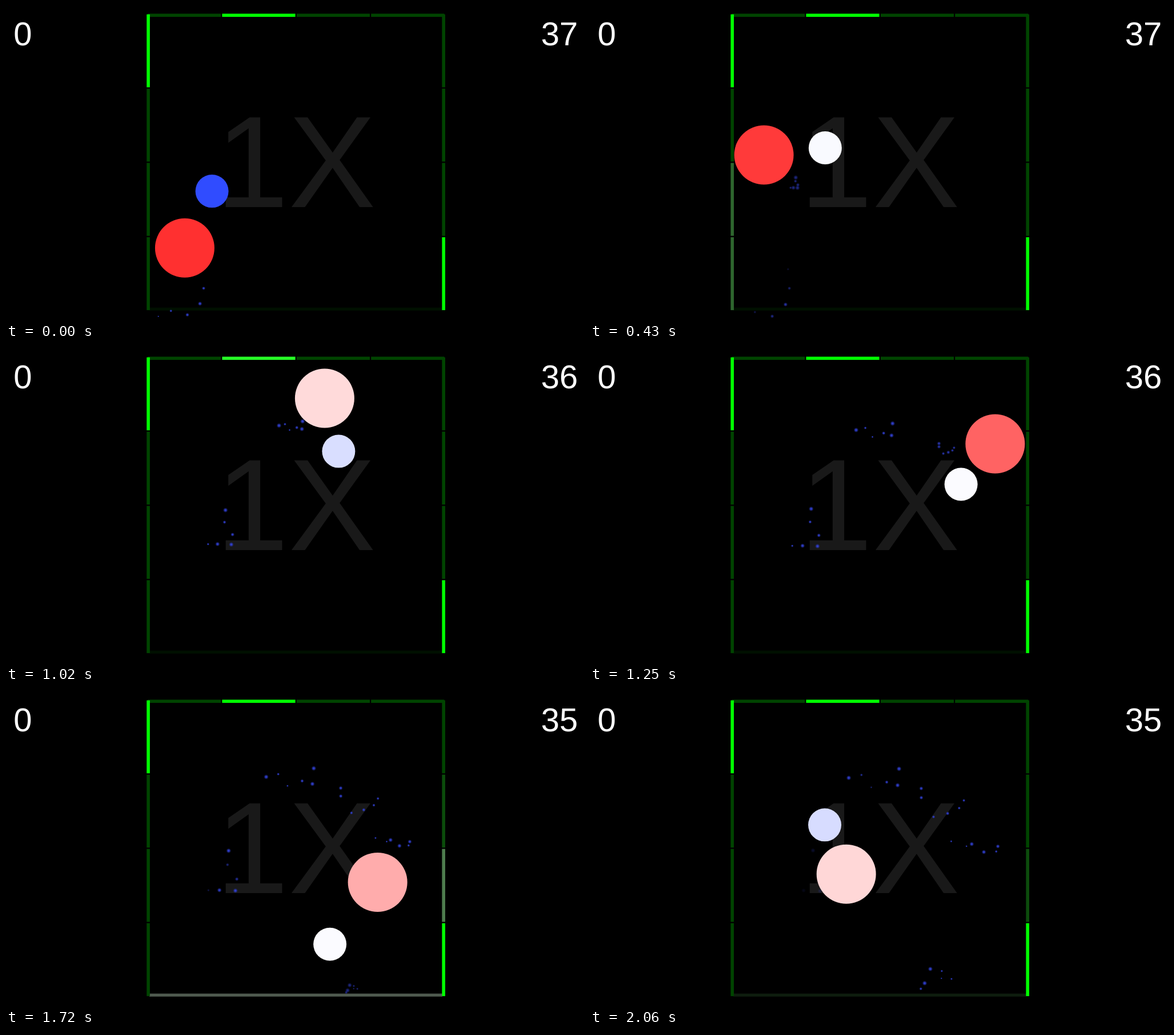
Animation, 1012 px wide and 553 px high, one loop 2090 ms. Source, as an HTML page:

```html
<!DOCTYPE html>
<html lang="en">
<head>
<meta charset="utf-8">
<title>Bouncing balls</title>
<style>
  html, body { margin: 0; width: 100%; height: 100%; overflow: hidden; background: #000; }
  svg { display: block; width: 100%; height: 100%; }
  text { font-family: "Liberation Sans", Arial, sans-serif; }
</style>
</head>
<body>
<svg viewBox="0 0 1012 553">
  <defs>
    <radialGradient id="spark">
      <stop offset="0" stop-color="#3a4af0"/>
      <stop offset=".45" stop-color="#2e3cc8" stop-opacity=".75"/>
      <stop offset="1" stop-color="#2030a0" stop-opacity="0"/>
    </radialGradient>
  </defs>
  <text x="507.4" y="353.4" font-size="229" text-anchor="middle" fill="#191919">1X</text>
  <g id="walls"></g>
  <g id="sparks"></g>
  <g id="balls"></g>
  <g fill="#fff" font-size="58">
    <text x="13.3" y="69.2">0</text>
    <text id="timer" x="1001.2" y="69.2" text-anchor="end">37</text>
  </g>
</svg>
<script>
const LOOP = 2090, BALL_FADE = 300, WALL_FADE = 520;
const LEFT = 246.3, TOP = 13.5, RIGHT = 769, BOTTOM = 534.7, THICK = 5.6, PITCH = 130.4;
const DARK = [0, 68, 0], LIT = [0, 255, 0], FLOOR = [0, 16, 0];
const $ = id => document.getElementById(id);
const clamp = v => Math.min(1, Math.max(0, v));

function set(el, attrs) {
  for (const k in attrs) el.setAttribute(k, attrs[k]);
  return el;
}
function add(parent, tag, attrs) {
  const el = document.createElementNS("http://www.w3.org/2000/svg", tag);
  return set($(parent).appendChild(el), attrs);
}
function whiten(rgb, u) {
  return `rgb(${rgb.map(c => Math.round(c + (255 - c) * u)).join()})`;
}

// Fades from 1 to 0 after the latest hit
function flash(hits, t, fade) {
  const last = hits.filter(h => h <= t).pop();
  return last === undefined ? 0 : clamp(1 - (t - last) / fade);
}

// Balls fly straight from one bounce [time, x, y] to the next
function ball(r, rgb, path) {
  return { r, rgb, path, hits: path.slice(1).map(p => p[0]), el: add("balls", "circle", { r }) };
}
const balls = [
  ball(52, [255, 48, 48], [[0, 313, 425], [145, 304, 395], [432, 304.5, 261], [702, 413, 71],
    [968, 530, 94], [1025, 560, 86], [1255, 712, 168], [1600, 711, 336], [2003, 510, 329], [2090, 418, 315]]),
  ball(29, [48, 76, 255], [[0, 360.5, 325.3], [422, 409.5, 251.4], [702, 481.5, 178], [966, 566, 166],
    [1245, 649, 235], [1350, 660, 280], [1610, 605, 500], [1715, 569.5, 446.5], [2003, 455, 270], [2090, 389, 215]])
];

// A wall glows when a bounce touches it
function wall(x, y, width, height, rgb) {
  const touches = (b, [, px, py]) => {
    const dx = px - Math.min(x + width, Math.max(x, px));
    const dy = py - Math.min(y + height, Math.max(y, py));
    return Math.hypot(dx, dy) < b.r + 2;
  };
  const hits = balls.flatMap(b => b.path.slice(1).filter(p => touches(b, p)).map(p => p[0]));
  return { rgb, hits, el: add("walls", "rect", { x, y, width, height }) };
}
const walls = [wall(LEFT + 4.7, BOTTOM - 5.2, 513, 5.2, FLOOR)];
for (let i = 0; i < 4; i++) {
  const shift = i * PITCH;
  walls.push(
    wall(LEFT + 1.7 + shift, TOP, 128.2, THICK, i == 1 ? LIT : DARK),
    wall(LEFT, TOP + 1.2 + shift, THICK, 128, i == 0 ? LIT : DARK),
    wall(RIGHT - THICK, TOP + 1.2 + shift, THICK, 128, i == 3 ? LIT : DARK)
  );
}

// Each burst: time, origin, heading; six sparks fan out and slow down
let seed = 7;
const random = () => (seed = seed * 16807 % 2147483647) / 2147483647;
const bursts = [
  [-1000, 290, 495, .8], [320, 350, 309, .4], [790, 500, 120, 1.5],
  [1100, 628, 164, 1.9], [1350, 687, 240, 1.8], [1610, 605, 531, -1.7]
];
const sparks = bursts.flatMap(([start, x, y, heading]) => Array.from({ length: 6 }, (_, i) => {
  const angle = heading + (i - 2.5) * .45 + (random() - .5) * .4;
  const reach = 35 + 35 * random(), size = 1 + 2.3 * random();
  return {
    start, x, y, dx: reach * Math.cos(angle), dy: reach * Math.sin(angle), life: 1200 + 200 * size,
    el: add("sparks", "circle", { r: size * 1.4, fill: "url(#spark)" })
  };
}));

function position(path, t) {
  const i = path.findIndex(p => p[0] > t);
  const [t0, x0, y0] = path[i - 1], [t1, x1, y1] = path[i];
  const u = (t - t0) / (t1 - t0);
  return { cx: x0 + (x1 - x0) * u, cy: y0 + (y1 - y0) * u };
}

function draw(t) {
  for (const w of walls) set(w.el, { fill: whiten(w.rgb, .4 * flash(w.hits, t, WALL_FADE)) });
  for (const b of balls) {
    set(b.el, { ...position(b.path, t), fill: whiten(b.rgb, flash(b.hits, t, BALL_FADE)) });
  }
  for (const s of sparks) {
    const age = t - s.start;
    const spread = 1 - Math.exp(-.0026 * Math.max(0, age));
    set(s.el, {
      cx: s.x + s.dx * spread,
      cy: s.y + s.dy * spread,
      opacity: clamp(Math.min(age / 180, (s.life - age) / 400))
    });
  }
  $("timer").textContent = 37 - Math.floor((t + 400) / 1000);
}

const began = performance.now();
function tick() {
  draw((performance.now() - began) % LOOP);
  requestAnimationFrame(tick);
}
tick();
</script>
</body>
</html>
```
